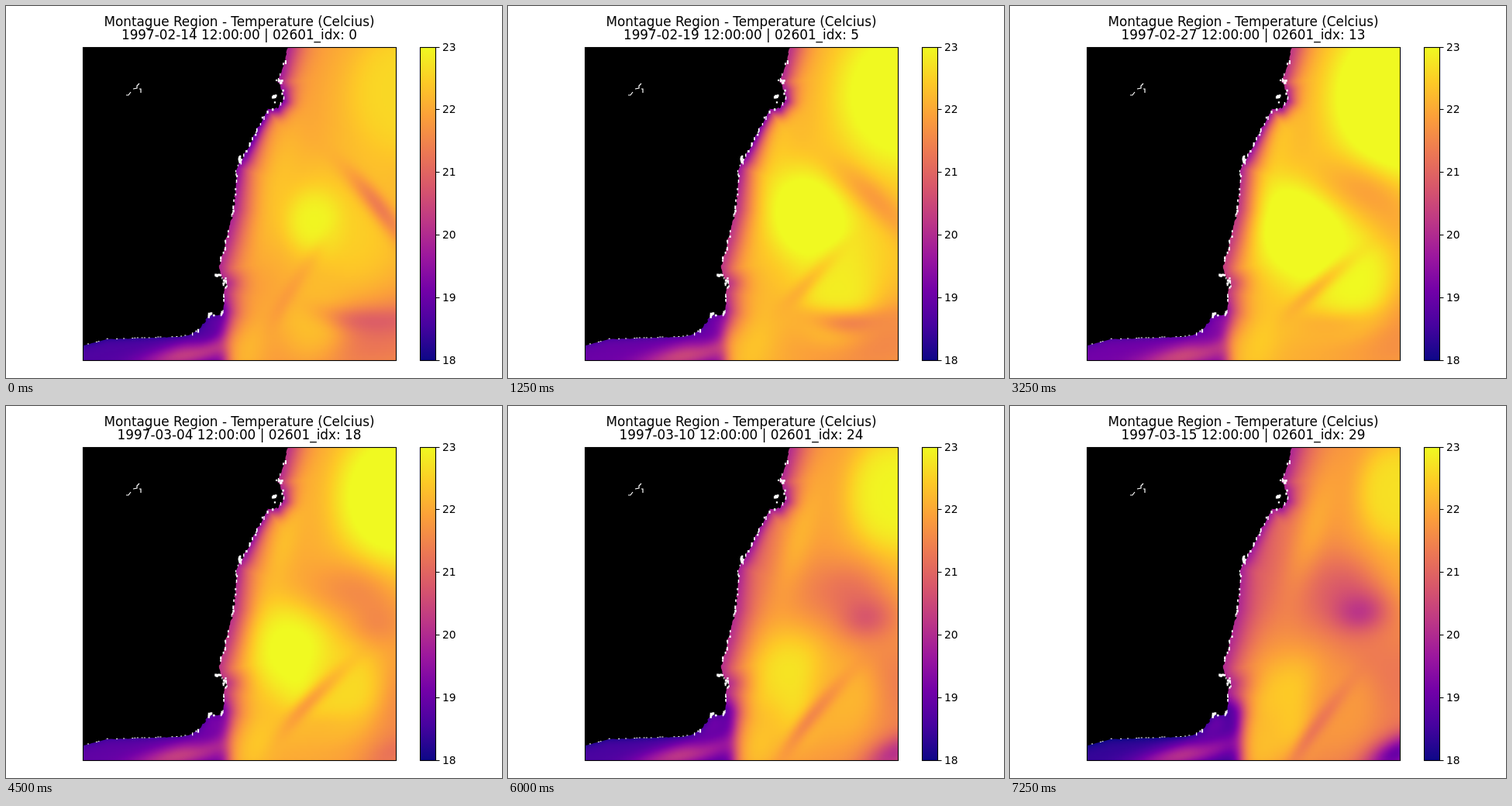
An HTML page with a canvas that plays this animation: 640 px wide and 480 px high, repeating every 7.5 s.

```html
<!DOCTYPE html>
<html lang="en">
<head>
<meta charset="utf-8">
<title>Sea temperature</title>
<style>
html, body { margin: 0; width: 100%; height: 100%; overflow: hidden; background: #fff; }
canvas { display: block; width: 640px; height: 480px; }
</style>
</head>
<body>
<canvas id="stage" width="640" height="480"></canvas>
<script>
const ctx = document.getElementById('stage').getContext('2d');
const STEP = 250, DAYS = 30, PEAK_DAY = 9, LAST_DAY = DAYS - 1;
const LEFT = 99.5, TOP = 53.5, SIZE = 404, CELLS = 202, CELL = SIZE / CELLS;

const PLASMA = ['0d0887', '46039f', '7201a8', '9c179e', 'bd3786', 'd8576b', 'ed7953', 'fb9f3a', 'fdca26', 'f0f921']
  .map(hex => [0, 2, 4].map(i => parseInt(hex.slice(i, i + 2), 16)));

const COAST = [[364, 53.5], [356, 85], [351, 98], [357, 110], [358, 122], [350, 132], [338, 133], [325, 157],
  [307, 195], [298, 208], [294, 262], [285, 300], [275, 335], [276, 346], [285, 358], [281, 370], [281, 392],
  [277, 398], [262, 399], [248, 418], [236, 425], [222, 427], [130, 430], [99.5, 438]];

const lerp = (a, b, t) => a + (b - a) * t;
const bell = (v, width) => Math.exp(-(v * v) / (width * width));
const sigmoid = v => 1 / (1 + Math.exp(-v));
const seeded = seed => () => (seed = (seed * 16807) % 2147483647) / 2147483647;

// Three-part values run start -> peak -> end; numbers and pairs stay constant.
function at(value, day) {
  if (!Array.isArray(value) || value.length < 3) return value;
  const early = day < PEAK_DAY;
  const t = early ? day / PEAK_DAY : (day - PEAK_DAY) / (LAST_DAY - PEAK_DAY);
  const [a, b] = early ? value : value.slice(1);
  return Array.isArray(a) ? a.map((v, i) => lerp(v, b[i], t)) : lerp(a, b, t);
}

const climate = {
  open: [21.9, 22.4, 21.4],
  shore: [20, 20.4, 20],
  shoreDip: [1, 0.9, 0.3],
  inlet: [18.7, 19.3, 18.4],
  inletEdge: [284, 277, 297]
};

// Painted in order, each one covering those before it.
const offshore = [
  { name: 'south-east water', path: [[480, 420], [470, 440], [480, 330]], size: [85, 48], tilt: -12, temp: [21.2, 21.7, 21.2] },
  { name: 'inshore tongue', path: [[380, 110], [375, 130], [330, 210]], size: [26, 85], tilt: 16, temp: [21.8, 22.2, 21.1] },
  { name: 'warm ridge', path: [[350, 230], [330, 200], [393, 160]], size: [20, 80], tilt: 15, temp: [22.2, 22.5, 22] },
  { name: 'north-east halo', path: [[500, 130], [500, 125], [500, 140]], size: [[76, 100], [104, 130], [76, 135]], temp: [22.4, 22.6, 22.2], edge: 3 },
  { name: 'north-east eddy', path: [[510, 110], [500, 120], [498, 112]], size: [[55, 70], [88, 102], [42, 58]], temp: [22.6, 23.7, 22.7], edge: 4 },
  { name: 'central halo', path: [[428, 285], [400, 300], [355, 380]], size: [[75, 95], [88, 108], [62, 85]], tilt: [-45, -30, 20], temp: [22.5, 22.75, 22.1], edge: 3 },
  { name: 'central eddy', path: [[398, 278], [380, 268], [357, 388]], size: [[32, 36], [56, 72], [36, 50]], tilt: [0, -55, 20], temp: [22.95, 23.6, 22.5], edge: 3 },
  { name: 'trailing lobe', path: [[395, 402], [450, 345], [430, 390]], size: [42, 54], tilt: 8, temp: [22.3, 23.3, 21.8], edge: 3 },
  { name: 'filament', path: [[482, 260], [472, 245], [428, 238]], size: [[52, 11], [65, 20], [46, 40]], tilt: [52, 38, 0], bend: 0.2, temp: [21.4, 22.2, 20.9] },
  { name: 'early cool arc', path: [[478, 408], [420, 412], [400, 410]], size: [50, 14], bend: -0.4, temp: [20.9, 22, 21.8], strength: [1, 1, 0] },
  { name: 'late cool patch', path: [[500, 300], [500, 300], [450, 265]], size: [28, 22], temp: 20.2, strength: [0, 0, 1] },
  { name: 'dark streak', path: [[345, 400], [370, 375], [395, 415]], size: [65, 9], tilt: [-58, -40, -55], bend: 0.2, temp: [21.8, 22.3, 21.3] },
  { name: 'southern ridge', path: [[312, 440], [322, 430], [328, 430]], size: [22, 45], tilt: 18, temp: [22.2, 22.5, 22.3] },
  { name: 'far corner', path: [498, 449], size: [37, 18], tilt: -30, temp: 19, strength: [0, 0, 1] }
];
const channel = [
  { name: 'pink tongue', path: [[240, 448], [228, 451], [225, 450]], size: [58, 13], tilt: -14, temp: [20.4, 20.6, 20.1] },
  { name: 'cold corner', path: [262, 412], size: [24, 14], tilt: -48, temp: [18.8, 19.3, 19] }
];

function resolve({ path, size, tilt = 0, temp, bend = 0, edge = 2, strength = 1 }, day) {
  const [x, y] = at(path, day), [rx, ry] = at(size, day), angle = at(tilt, day) * Math.PI / 180;
  return {
    x, y, rx, ry, bend, temp: at(temp, day), power: edge / 2, weight: at(strength, day) ** 2,
    cos: Math.cos(angle), sin: Math.sin(angle)
  };
}

function blend(temp, m, x, y) {
  const dx = x - m.x, dy = y - m.y;
  const u = (dx * m.cos + dy * m.sin) / m.rx;
  const v = (dy * m.cos - dx * m.sin) / m.ry - m.bend * u * u;
  const r2 = u * u + v * v;
  return r2 > 9 ? temp : lerp(temp, m.temp, m.weight * Math.exp(-0.693 * r2 ** m.power));
}

function segmentDistance(x, y, [ax, ay], [bx, by]) {
  const dx = bx - ax, dy = by - ay;
  const t = Math.max(0, Math.min(1, ((x - ax) * dx + (y - ay) * dy) / (dx * dx + dy * dy)));
  return Math.hypot(x - ax - t * dx, y - ay - t * dy);
}

const random = seeded(77);
const jitter = amount => (random() - 0.5) * amount;

const shoreline = [];
COAST.slice(1).forEach((q, i) => {
  const p = COAST[i], parts = Math.ceil(Math.hypot(q[0] - p[0], q[1] - p[1]) / 3);
  const rough = q[1] > 424 ? 0.8 : 2.4;
  for (let k = 0; k < parts; k++) {
    const edge = i + k ? rough : 0;
    shoreline.push([lerp(p[0], q[0], k / parts) + jitter(edge), lerp(p[1], q[1], k / parts) + jitter(edge)]);
  }
});

const land = new Path2D();
[[LEFT, TOP], ...shoreline, COAST[COAST.length - 1]].forEach(([x, y]) => land.lineTo(x, y));
land.closePath();

// White gaps: thin flecks along the coast and a few ragged clusters.
const gaps = new Path2D();
for (const [x, y] of shoreline) {
  if (y < 56 || random() > 0.4) continue;
  if (y > 424) gaps.rect(x, y - 1, 2, 1);
  else gaps.rect(x - 1, y - 1, 1 + random() * 1.5, 2 + random() * 3);
}
for (const [cx, cy, w, h] of [[347, 120, 5, 10], [353, 97, 9, 4], [303, 197, 4, 9], [275, 347, 9, 2], [281, 356, 6, 10], [265, 398, 7, 3]]) {
  for (let i = 0; i < 8; i++) {
    const s = 1.5 + random() * 2;
    gaps.rect(cx + jitter(w) - s / 2, cy + jitter(h) - s / 2, s, s);
  }
}

const sea = [];
for (let i = 0; i < CELLS * CELLS; i++) {
  const x = LEFT + (i % CELLS + 0.5) * CELL, y = TOP + (Math.floor(i / CELLS) + 0.5) * CELL;
  let d = Infinity;
  for (let k = 1; k < COAST.length; k++) d = Math.min(d, segmentDistance(x, y, COAST[k - 1], COAST[k]));
  if (d < 6 || !ctx.isPointInPath(land, x, y)) sea.push({ x, y, d, offset: i * 4 });
}

const field = document.createElement('canvas');
field.width = field.height = CELLS;
const fieldCtx = field.getContext('2d');
const pixels = fieldCtx.createImageData(CELLS, CELLS);

function paintSea(day) {
  const now = {};
  for (const key in climate) now[key] = at(climate[key], day);
  const outer = offshore.map(m => resolve(m, day)), inner = channel.map(m => resolve(m, day));

  for (const { x, y, d, offset } of sea) {
    let temp = outer.reduce((t, m) => blend(t, m, x, y), now.open);
    const shore = now.shore - now.shoreDip * bell(y - 165, 60);
    const width = 20 - 9 * bell(y - 150, 60);
    temp = lerp(temp, shore, Math.exp(-((d / width) ** 1.5)));
    if (y > 340) {
      const inside = sigmoid((now.inletEdge - x) / 5) * sigmoid((y - 383) / 6);
      const cold = inner.reduce((t, m) => blend(t, m, x, y), now.inlet) - 0.4 * Math.exp(-d / 5);
      temp = lerp(temp, cold, inside);
    }
    const p = Math.max(0, Math.min(8.9999, (temp - 18) / 5 * 9)), i = Math.floor(p);
    for (let c = 0; c < 3; c++) pixels.data[offset + c] = lerp(PLASMA[i][c], PLASMA[i + 1][c], p - i);
    pixels.data[offset + 3] = 255;
  }
  fieldCtx.putImageData(pixels, 0, 0);
  ctx.drawImage(field, LEFT, TOP, SIZE, SIZE);
}

function polyline(...points) {
  ctx.beginPath();
  points.forEach(([x, y]) => ctx.lineTo(x, y));
  ctx.stroke();
}

function paintLand() {
  ctx.fillStyle = '#000';
  ctx.fill(land);
  ctx.fillStyle = ctx.strokeStyle = '#fff';
  ctx.fill(gaps);
  ctx.lineWidth = 1.2;
  polyline([155, 115], [158, 115], [161, 111]);
  polyline([164, 107], [169, 106], [169, 103], [172, 100]);
  polyline([172, 107], [174, 107], [174, 112]);
}

function paintScale() {
  const gradient = ctx.createLinearGradient(0, TOP + SIZE, 0, TOP);
  PLASMA.forEach((rgb, i) => gradient.addColorStop(i / 9, `rgb(${rgb})`));
  ctx.fillStyle = gradient;
  ctx.fillRect(534.5, TOP, 20, SIZE);
  ctx.strokeStyle = ctx.fillStyle = '#000';
  ctx.lineWidth = 1.1;
  ctx.strokeRect(534.5, TOP, 20, SIZE);
  ctx.strokeRect(LEFT, TOP, SIZE, SIZE);
  ctx.font = '13.89px "DejaVu Sans", sans-serif';
  ctx.textAlign = 'left';
  for (let i = 0; i <= 5; i++) {
    const y = Math.floor(457 - i * 80.8) + 0.5;
    polyline([554.5, y], [559.5, y]);
    ctx.fillText(18 + i, 563, y + 4.5);
  }
}

function paintTitle(day) {
  const date = new Date(Date.UTC(1997, 1, 14 + day)).toISOString().slice(0, 10);
  ctx.fillStyle = '#000';
  ctx.font = '16.83px "DejaVu Sans", sans-serif';
  ctx.textAlign = 'center';
  ctx.fillText('Montague Region - Temperature (Celcius)', 301, 26);
  ctx.fillText(`${date} 12:00:00 | 02601_idx: ${day}`, 301, 43);
}

let shown = -1;
function tick(time) {
  const day = Math.floor(time / STEP) % DAYS;
  if (day !== shown) {
    shown = day;
    ctx.fillStyle = '#fff';
    ctx.fillRect(0, 0, 640, 480);
    paintSea(day);
    paintLand();
    paintScale();
    paintTitle(day);
  }
  requestAnimationFrame(tick);
}
tick(performance.now());
</script>
</body>
</html>
```
